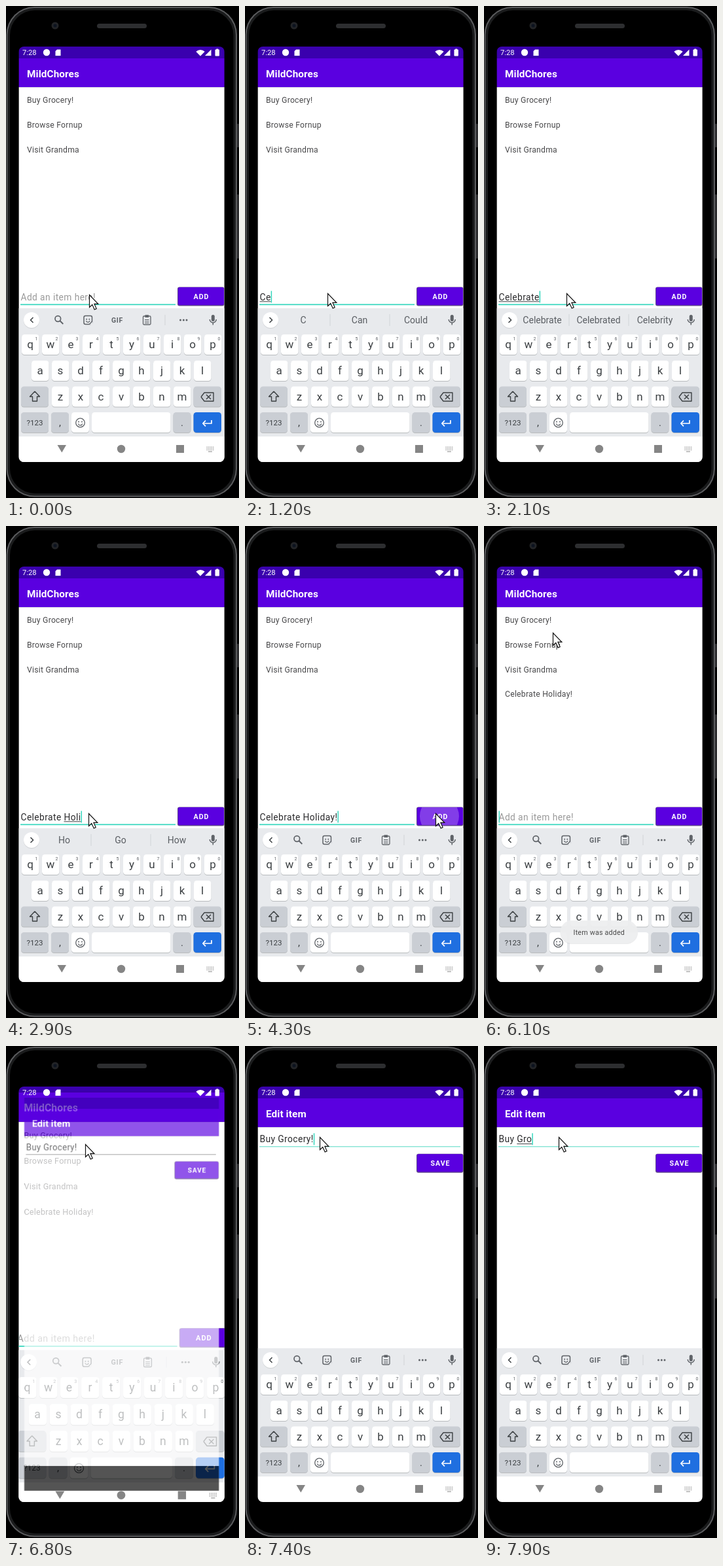
Animation of 356x752 px, one loop 8000 ms. Source, as an HTML page with a canvas:

```html
<!DOCTYPE html>
<html lang="en">
<head>
<meta charset="utf-8">
<title>Todo demo</title>
<style>
html, body { margin: 0; width: 100%; height: 100%; overflow: hidden; background: #000; }
canvas { display: block; width: 356px; height: 752px; }
</style>
</head>
<body>
<canvas id="stage"></canvas>
<script>
const W = 356, H = 752, LOOP = 8000, STEP = 100;
const LEFT = 19.4, WIDTH = 314.4, TOP = 62, BOTTOM = 697;
const PURPLE = '#5a00e0', DARK = '#3a00ae', TEAL = '#35d6bd', INK = '#3c4043', GREY = '#5f6368';
const dpr = window.devicePixelRatio || 1;

function setup(canvas) {
  canvas.width = W * dpr;
  canvas.height = H * dpr;
  const ctx = canvas.getContext('2d');
  ctx.scale(dpr, dpr);
  return ctx;
}
const stage = setup(document.getElementById('stage'));
const layerCanvas = document.createElement('canvas');
const layer = setup(layerCanvas);
let g = stage;

const clamp = v => Math.max(0, Math.min(1, v));
const ramp = (t, a, b) => clamp((t - a) / (b - a));
const easeOut = u => 1 - (1 - u) * (1 - u);

function rect(x, y, w, h, fill) {
  g.fillStyle = fill;
  g.fillRect(x, y, w, h);
}
function band(y, h, fill) {
  rect(LEFT, y, WIDTH, h, fill);
}
function path(x, y, w, h, r) {
  g.beginPath();
  g.roundRect(x, y, w, h, r);
}
function box(x, y, w, h, r, fill) {
  path(x, y, w, h, r);
  g.fillStyle = fill;
  g.fill();
}
function disc(x, y, r, fill) {
  g.beginPath();
  g.arc(x, y, r, 0, 7);
  g.fillStyle = fill;
  g.fill();
}
function poly(points, fill) {
  g.beginPath();
  points.forEach(([x, y]) => g.lineTo(x, y));
  g.closePath();
  g.fillStyle = fill;
  g.fill();
}
function line(points, color, width = 1.4) {
  g.beginPath();
  points.forEach(([x, y]) => g.lineTo(x, y));
  g.strokeStyle = color;
  g.lineWidth = width;
  g.stroke();
}
function ring(x, y, r, color, width = 1.4) {
  g.beginPath();
  g.arc(x, y, r, 0, 7);
  g.strokeStyle = color;
  g.lineWidth = width;
  g.stroke();
}
function text(str, x, y, size, color, { weight = 400, align = 'left', gap = 0 } = {}) {
  g.font = `${weight} ${size}px Roboto, sans-serif`;
  g.letterSpacing = gap + 'px';
  g.textAlign = align;
  g.fillStyle = color;
  g.fillText(str, x, y);
  return g.measureText(str).width;
}

// Timeline

const PHRASE = 'Celebrate Holiday!';
const KEY_TIMES = [1000, 1100, 1300, 1500, 1600, 1700, 1900, 2000, 2100,
  2300, 2400, 2600, 2700, 2800, 3000, 3100, 3200, 3400];
const SUGGESTIONS = [
  [1000, 'C', 'Can', 'Could'],
  [1400, 'Cell', 'Celebrate', 'Celery'],
  [1900, 'Celebrate', 'Celebrated', 'Celebrity'],
  [2300, 'the', 'your', 'my'],
  [2500, 'Ho', 'Go', 'How'],
  [3000, 'Hold', 'Holiday', 'Holidays'],
  [3400]
];
const POINTER = [
  [0, 127, 441], [100, 127, 441], [500, 126, 439], [3400, 126, 439], [4000, 291, 439],
  [4400, 291, 439], [4900, 160, 190], [5000, 146, 165], [5100, 83, 141], [5700, 83, 141],
  [5800, 90, 154], [6000, 90, 154], [6100, 105, 163], [6300, 112, 160], [6500, 119, 152],
  [6800, 121, 150], [7100, 114, 139], [8000, 114, 139]
];
const ADDED = 4400;

function pointerAt(t) {
  const i = Math.max(1, POINTER.findIndex(p => p[0] > t));
  const a = POINTER[i - 1], b = POINTER[i], u = ramp(t, a[0], b[0]);
  return [a[1] + (b[1] - a[1]) * u, a[2] + (b[2] - a[2]) * u];
}
function typedAt(t) {
  return t >= ADDED ? '' : PHRASE.slice(0, KEY_TIMES.filter(k => k <= t).length);
}
function editedAt(t) {
  const deleted = Math.max(0, Math.min(5, (t - 7400) / 100));
  return 'Buy Grocery!'.slice(0, 12 - deleted);
}

// Phone

function phone() {
  rect(0, 0, W, H, '#000');
  box(353, 180, 3, 36, 1, '#2c2c2e');
  box(353, 288, 3, 98, 1, '#2c2c2e');
  box(0.5, 1, 352.5, 749.5, 43, '#5c5d5f');
  box(2.5, 3, 348.5, 745.5, 41, '#1b1c1d');
  box(6, 6.5, 341.5, 738.5, 38, '#000');
  box(139, 27, 76, 7, 3.5, '#2d2e30');
  disc(75, 30, 5.5, '#222427');
  disc(75, 30, 2.5, '#0d1420');
}

function statusIcons() {
  text('7:28', 25, 75, 11.2, '#fff');
  disc(62, 71, 5.2, '#fff');
  poly([[78, 66.5], [83.5, 66.5], [83.5, 76], [75.5, 76], [75.5, 69]], '#fff');
  g.beginPath();
  g.moveTo(297, 76.5);
  g.arc(297, 76.5, 9.5, -2.35, -0.79);
  g.fillStyle = '#fff';
  g.fill();
  poly([[304, 76], [313.5, 76], [313.5, 66.5]], '#fff');
  box(319.5, 66.5, 6.5, 10, 1, '#fff');
  rect(321.3, 65.5, 3, 1.5, '#fff');
}

function appBar(title) {
  band(124, BOTTOM - 124, '#fff');
  band(TOP, 18, DARK);
  band(80, 44, PURPLE);
  band(124, 1, 'rgba(0,0,0,.1)');
  text(title, 32, 108.5, 15.3, '#fff', { weight: 700, gap: 0.1 });
}

function button(label, y, press = 0) {
  box(262, y, 71.5, 29, 3, 'rgba(40,0,110,.75)');
  box(263, y + 0.5, 70, 27, 3, PURPLE);
  if (press) {
    g.save();
    path(263, y + 0.5, 70, 27, 3);
    g.clip();
    disc(297, y + 14, 30 * press, 'rgba(255,255,255,.24)');
    g.restore();
  }
  text(label, 298.5, y + 18, 10.7, '#fff', { weight: 700, align: 'center', gap: 0.95 });
}

function field(value, x, base, caret) {
  const width = text(value, x, base, 13.75, '#2a2a2c', { gap: 0.43 });
  const word = value.match(/[A-Za-z]+$/);
  if (caret && word) {
    const w = g.measureText(word[0]).width;
    rect(x + width - w, base + 1.8, w, 1, INK);
  }
  if (caret) rect(x + width, base - 14, 1.5, 18, TEAL);
}

function listScreen(t) {
  appBar('MildChores');
  const items = ['Buy Grocery!', 'Browse Fornup', 'Visit Grandma'];
  if (t >= ADDED) items.push(PHRASE);
  items.forEach((s, i) => text(s, 32, 148 + i * 37.8, 12.2, '#48484a', { gap: 0.25 }));
  const value = typedAt(t);
  const caret = t >= 500 && !(t >= 5300 && t < 5600);
  if (!value) text('Add an item here!', 22.5, 449.5, 13.75, '#999', { gap: 0.43 });
  field(value, 22.5, 449.5, caret);
  rect(22, 455.5, 237, 1.7, TEAL);
  button('ADD', 429.5, t >= 4200 && t < 4500 ? ramp(t, 4100, 4300) : 0);
  keyboard(t);
}

function editScreen(t) {
  appBar('Edit item');
  const focus = t >= 7200;
  field(editedAt(t), 22.5, 147.3, focus);
  rect(22, 153.2, 307, 1.2, focus ? '#6fdfcc' : '#888');
  button('SAVE', 164.8);
  const rise = ramp(t, 7000, 7300);
  if (rise > 0) {
    g.save();
    g.translate(0, 196 * (1 - easeOut(rise)));
    keyboard(0);
    g.restore();
  }
  if (!focus) band(657, 40, '#000');
}

// Keyboard

function navIcons(color) {
  poly([[78.5, 671], [92, 671], [85.3, 682.5]], color);
  disc(176, 677, 6.2, color);
  rect(260, 671, 12, 12, color);
}

function key(x, y, w, fill = '#fff') {
  box(x, y + 1, w, 31, 4.5, 'rgba(60,64,67,.28)');
  box(x, y, w, 31, 4.5, fill);
}

function letters(row, x, y) {
  [...row].forEach((c, i) => {
    const cx = x + i * 31;
    key(cx - 13, y, 26.5);
    text(c, cx, y + 21, 17, INK, { align: 'center' });
    if (row.length === 10) text((i + 1) % 10, cx + 9.5, y + 9, 7, GREY, { align: 'center' });
  });
}

function mic(x, y) {
  box(x - 2.5, y - 8, 5, 10, 2.5, GREY);
  g.beginPath();
  g.arc(x, y - 1, 5, 0, Math.PI);
  g.strokeStyle = GREY;
  g.lineWidth = 1.5;
  g.stroke();
  line([[x, y + 4], [x, y + 7.5]], GREY, 1.5);
}

function face(x, y, r) {
  disc(x - r * 0.38, y - r * 0.22, 1, GREY);
  disc(x + r * 0.38, y - r * 0.22, 1, GREY);
  g.beginPath();
  g.arc(x, y + r * 0.1, r * 0.5, 0.2, 2.94);
  g.strokeStyle = GREY;
  g.lineWidth = 1.2;
  g.stroke();
}

function toolbar() {
  line([[41.5, 476], [37.5, 480], [41.5, 484]], INK, 1.5);
  ring(79.3, 478, 4.3, GREY, 1.7);
  line([[82.5, 481.3], [87.3, 486]], GREY, 1.9);
  path(119, 473.5, 12.5, 13, 2.5);
  g.strokeStyle = GREY;
  g.lineWidth = 1.5;
  g.stroke();
  face(125.2, 480, 5.5);
  poly([[132.2, 482], [132.2, 487.2], [127, 487.2]], '#e8eaed');
  line([[131.5, 482], [127.5, 486.5]], GREY, 1.3);
  text('GIF', 170, 483.5, 10.5, GREY, { weight: 700, align: 'center', gap: 0.7 });
  path(209.5, 474, 11.5, 13, 1.5);
  g.stroke();
  rect(212.5, 472.2, 5.5, 3.8, GREY);
  for (const y of [479, 481.5, 484]) rect(212, y, 6.5, 1, GREY);
  rect(242.5, 472, 1, 16, '#d2d4d8');
  for (const x of [266.5, 271.3, 276]) disc(x, 480, 1.5, GREY);
}

function suggestions(words) {
  line([[37.5, 476], [41.5, 480], [37.5, 484]], INK, 1.5);
  words.forEach((w, i) => text(w, 89 + i * 86, 485, 14, '#5a5e63', { align: 'center' }));
  for (const x of [129.5, 220.5]) rect(x, 471, 1, 18, '#d0d3d7');
}

function keyboard(t) {
  band(462, 196, '#e8eaed');
  band(658, 39, '#fff');
  disc(39, 481, 12, 'rgba(60,64,67,.15)');
  disc(39, 480, 12, '#fff');
  const words = SUGGESTIONS.filter(s => s[0] <= t).pop();
  if (words && words.length > 1) suggestions(words.slice(1));
  else toolbar();
  mic(316.3, 480);

  letters('qwertyuiop', 37, 502);
  letters('asdfghjkl', 52, 542);
  letters('zxcvbnm', 83, 581.5);
  const MUTED = '#caced4';
  key(23, 581.5, 42, MUTED);
  g.lineJoin = 'round';
  line([[44, 589], [36.5, 597], [40.5, 597], [40.5, 604], [47.5, 604], [47.5, 597], [51.5, 597], [44, 589]], INK, 1.4);
  key(286.5, 581.5, 42.5, MUTED);
  line([[298, 597.5], [303, 591], [317, 591], [317, 604], [303, 604], [298, 597.5]], INK, 1.4);
  line([[306, 594], [313, 601]], INK);
  line([[313, 594], [306, 601]], INK);

  key(23, 621, 42, MUTED);
  text('?123', 44, 641, 11.5, INK, { align: 'center' });
  key(69, 621, 27, MUTED);
  text(',', 82.5, 642, 15, INK, { align: 'center' });
  key(100, 621, 27);
  ring(113.5, 637, 6.8, GREY, 1.3);
  face(113.5, 637, 6.5);
  key(131, 621, 120.5);
  key(255.5, 621, 27, MUTED);
  text('.', 269, 642, 15, INK, { align: 'center' });
  key(286.5, 621, 42.5, '#1f6fe0');
  line([[314, 633], [314, 638], [301, 638]], '#fff', 1.7);
  line([[305, 633.7], [300.8, 638], [305, 642.3]], '#fff', 1.7);

  navIcons('#858585');
  for (let r = 0; r < 3; r++)
    for (let c = 0; c < 5; c++) rect(306.5 + c * 2.4, 673.5 + r * 2.2, 1.3, 1.2, '#999');
  rect(309, 680.5, 6, 1.2, '#999');
}

// Overlays

function toast(t) {
  const alpha = Math.min(ramp(t, 4400, 4800), 1 - ramp(t, 6400, 6700));
  if (alpha <= 0) return;
  g.save();
  g.globalAlpha = alpha;
  box(116.5, 604, 118.5, 35, 17.5, 'rgba(60,64,67,.1)');
  box(116.5, 603, 118.5, 35, 17.5, 'rgba(238,239,240,.93)');
  text('Item was added', 175.8, 624.5, 10.7, '#4a4a4a', { align: 'center', gap: 0.2 });
  g.restore();
}

function pointer(t) {
  const [x, y] = pointerAt(t);
  g.save();
  g.translate(x, y);
  g.lineJoin = 'miter';
  poly([[0.5, 0.5], [0.5, 19.5], [4.8, 15.5], [8.2, 23], [11.2, 21.6], [7.9, 14.3], [13.8, 14.3]], '#fff');
  g.strokeStyle = '#111';
  g.lineWidth = 1.2;
  g.stroke();
  g.restore();
}

function zoom(s, draw) {
  g.save();
  g.translate(176.5, 377);
  g.scale(s, s);
  g.translate(-176.5, -377);
  draw();
  g.restore();
}

function draw(t) {
  g = stage;
  phone();
  g.save();
  path(LEFT, TOP, WIDTH, BOTTOM - TOP, 8);
  g.clip();
  const p = easeOut(ramp(t, 6600, 7100));
  if (p < 1) zoom(1 + 0.05 * p, () => listScreen(t));
  if (p > 0) {
    g = layer;
    g.clearRect(0, 0, W, H);
    editScreen(t);
    g = stage;
    g.globalAlpha = Math.min(1, 1.05 * p);
    zoom(0.85 + 0.15 * p, () => g.drawImage(layerCanvas, 0, 0, W, H));
    g.globalAlpha = 1;
  }
  statusIcons();
  toast(t);
  g.restore();
  pointer(t);
}

const start = performance.now();
function tick() {
  const t = (performance.now() - start) % LOOP;
  draw(Math.floor(t / STEP) * STEP);
  requestAnimationFrame(tick);
}
tick();
</script>
</body>
</html>
```
